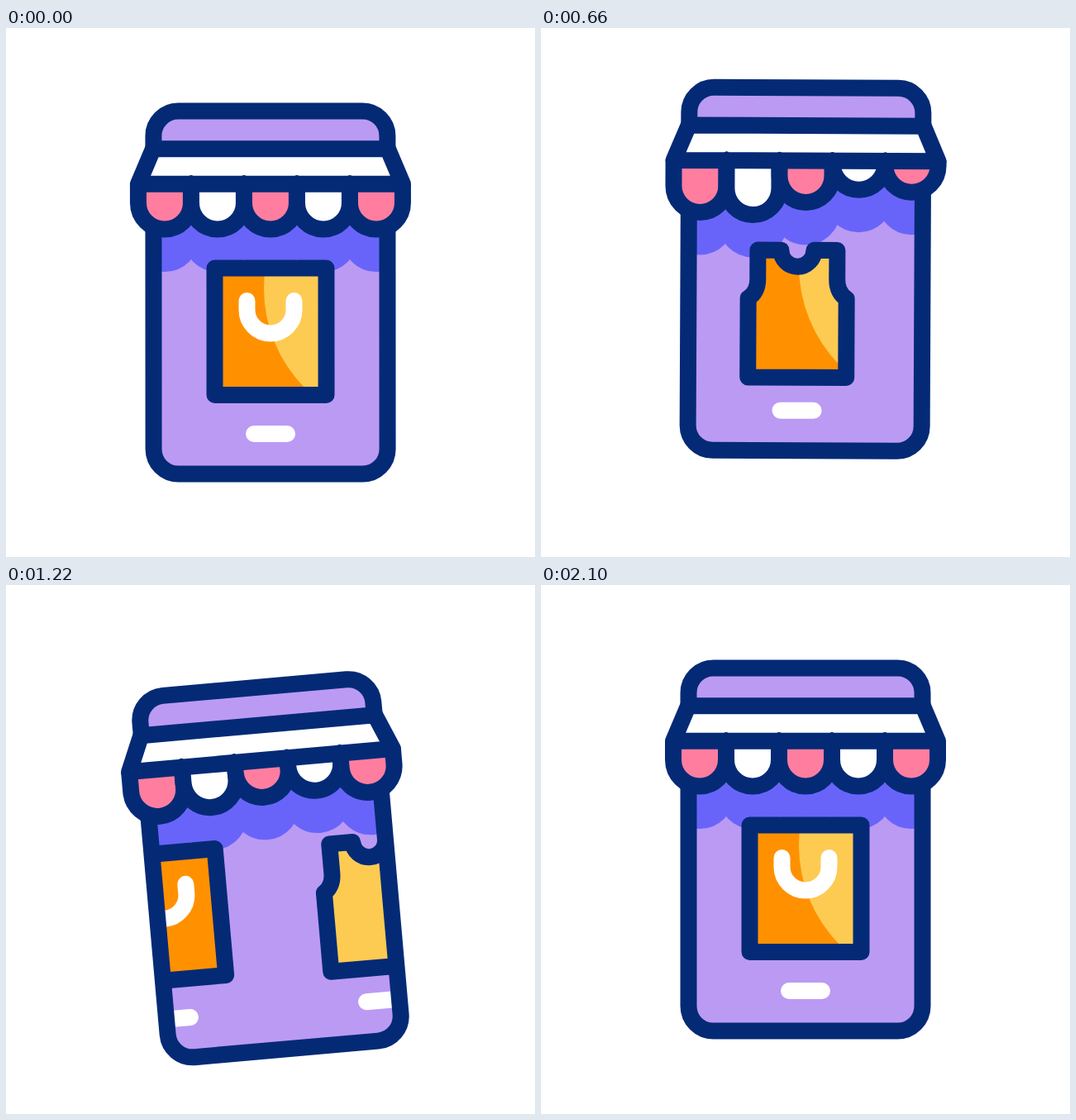
Animation, 640 px wide and 640 px high, one loop 2400 ms. Source, as an HTML page:

```html
<!DOCTYPE html>
<html lang="en">
<head>
<meta charset="utf-8">
<title>Shop on a phone</title>
<style>
  html, body { margin: 0; height: 100%; overflow: hidden; background: #fff; }
  svg { display: block; width: 100%; height: 100%; }
  .line { stroke: #042a76; stroke-width: 20; stroke-linejoin: round; }
  .white { fill: none; stroke: #fff; stroke-width: 20; stroke-linecap: round; }
  .shade path { fill: #6964f9; stroke: #6964f9; stroke-width: 20; }
  .item { fill: #ff9100; }
  .light { fill: #fdcb52; }
</style>
</head>
<body>
<svg viewBox="0 0 640 640">
  <defs>
    <rect id="body" x="178.5" y="100.5" width="283" height="439" rx="30"/>
    <path id="bag" d="M252.5 290.5H387.5V444H252.5Z"/>
    <path id="shirt" d="M272 297H300a20 20 0 0 0 40 0H368V332.5Q368 348 379.5 355.5V451H260.5V355.5Q272 348 272 332.5Z"/>
    <clipPath id="inBody"><use href="#body"/></clipPath>
    <clipPath id="inBag"><use href="#bag"/></clipPath>
    <clipPath id="inShirt"><use href="#shirt"/></clipPath>
  </defs>
  <g id="phone">
    <use href="#body" fill="#bb9af3"/>
    <g clip-path="url(#inBody)">
      <g class="shade" id="shade"></g>
      <g class="page">
        <use href="#bag" class="item"/>
        <g clip-path="url(#inBag)"><circle class="light" cy="315" r="171.5"/></g>
        <use href="#bag" class="line" fill="none"/>
        <path class="white" d="M291.5 330V341a28.5 28.5 0 0 0 57 0V330M300 491H340"/>
      </g>
      <g class="page">
        <use href="#shirt" class="item"/>
        <g clip-path="url(#inShirt)"><circle class="light" cy="315" r="171.5"/></g>
        <use href="#shirt" class="line" fill="none"/>
        <path class="white" d="M300 491H340"/>
      </g>
    </g>
    <use href="#body" class="line" fill="none"/>
    <g id="flaps"></g>
    <path class="line" fill="#fff" d="M178 146.3L160 188.8H480L462 146.3Z"/>
    <path d="M224 181h0M288 181h0M352 181h0M416 181h0" stroke="#042a76" stroke-width="6" stroke-linecap="round"/>
  </g>
</svg>
<script>
const LOOP = 2400, PAGE = 254, FLAP_DELAY = 110;
const $ = id => document.getElementById(id);

const smooth = x => x * x * (3 - 2 * x);
const soft = x => (x + smooth(x)) / 2;

// Value at time t along [time, value] keys
function track(keys, t, ease = smooth) {
  if (t <= keys[0][0]) return keys[0][1];
  for (let i = 1; i < keys.length; i++) {
    const [t0, a] = keys[i - 1], [t1, b] = keys[i];
    if (t < t1) return a + (b - a) * ease((t - t0) / (t1 - t0));
  }
  return keys[keys.length - 1][1];
}

const tilt = [[0, 0], [410, -18.4], [879, 15.9], [1305, -8.7], [1664, 4.4], [2100, 0]];
const bounce = [[0, 0], [350, 54], [735, -37], [1058, 53.5], [1425, -20.3], [1770, 15.5], [2100, 0]];
const slide = [[15, 0], [747, 1], [950, 1], [1508, 2]];
const wave = [[10, 0], [300, -21], [580, 12], [905, -12.5], [1260, 2.6], [1450, 0]];

function addPath(parent) {
  const path = document.createElementNS('http://www.w3.org/2000/svg', 'path');
  return parent.appendChild(path);
}

const flaps = [0, 1, 2, 3, 4].map(i => {
  const cloth = addPath($('flaps'));
  cloth.setAttribute('class', 'line');
  cloth.setAttribute('fill', i % 2 ? '#fff' : '#ff7ea0');
  return { x: 160 + 64 * i, cloth, shade: addPath($('shade')) };
});

const scallop = (x, top, bottom) => `M${x} ${top}V${bottom}a32 32 0 0 0 64 0V${top}`;

const pages = [...document.querySelectorAll('.page')].map(el => ({ el, light: el.querySelector('.light') }));

// The highlight stays fixed to the phone while the page moves
function placePage({ el, light }, x) {
  el.setAttribute('transform', `translate(${x})`);
  light.setAttribute('cx', 483.5 - x);
}

function draw(now) {
  const t = now % LOOP;
  $('phone').setAttribute('transform',
    `translate(0 ${track(bounce, t)}) rotate(${track(tilt, t, soft)} 320 320)`);

  const p = track(slide, t);
  placePage(pages[0], PAGE * (p <= 1 ? p : p - 2));
  placePage(pages[1], PAGE * (p - 1));

  flaps.forEach(({ x, cloth, shade }, i) => {
    const dy = track(wave, t - i * FLAP_DELAY);
    cloth.setAttribute('d', scallop(x, 188, 211.5 + dy));
    shade.setAttribute('d', scallop(x, 195, 253 + dy));
  });
}

const start = performance.now();
function loop() {
  draw(performance.now() - start);
  requestAnimationFrame(loop);
}
loop();
</script>
</body>
</html>
```
